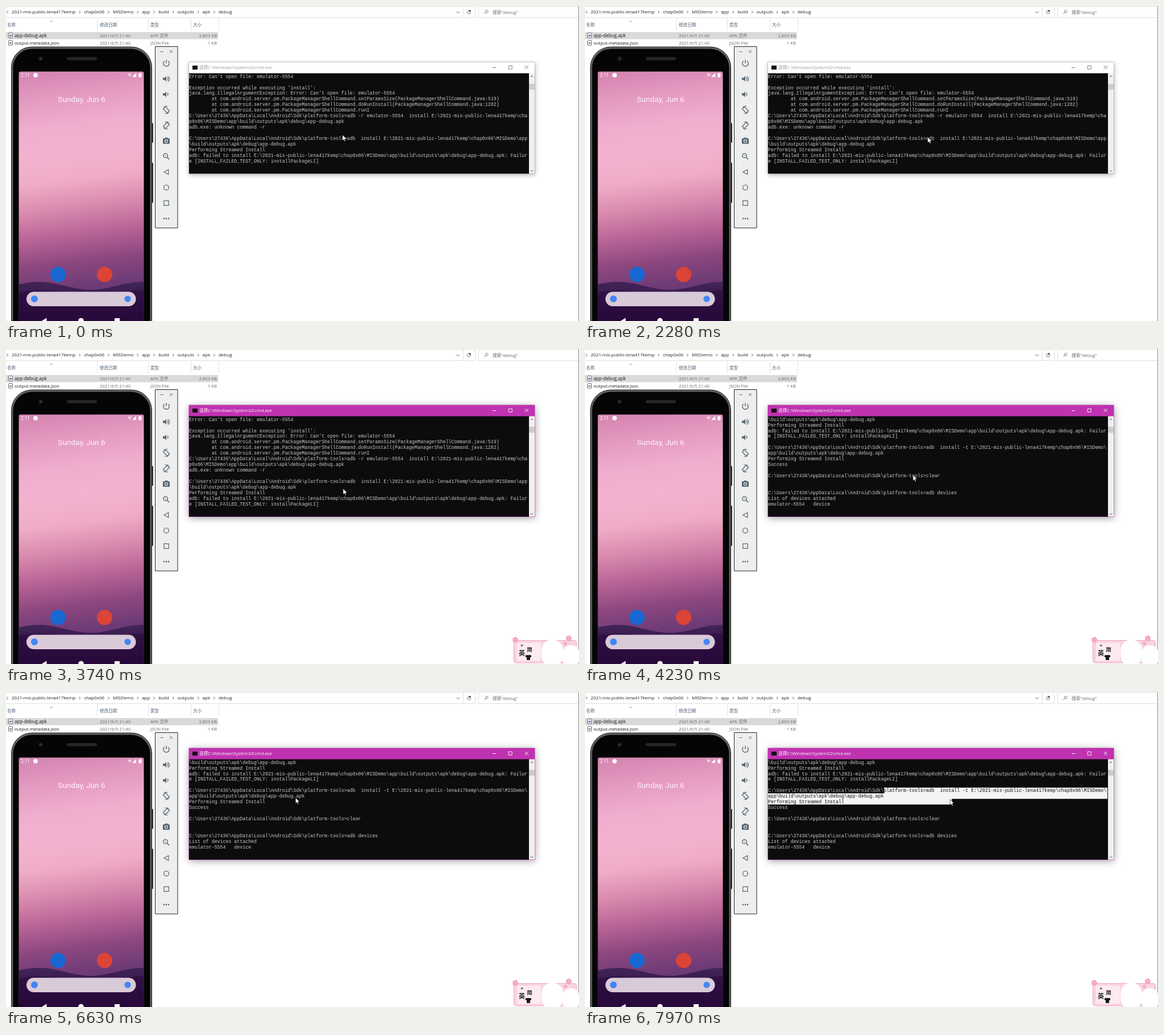
An HTML page with a canvas for the animation above (8 s loop, 1008 by 555 pixels).

```html
<!DOCTYPE html>
<html lang="zh">
<head>
<meta charset="utf-8">
<title>Install log</title>
<style>
html, body { margin: 0; width: 100%; height: 100%; overflow: hidden; background: #fff; }
canvas { display: block; width: 1008px; height: 555px; }
</style>
</head>
<body>
<canvas id="stage" width="1008" height="555"></canvas>
<script>
const ctx = document.getElementById('stage').getContext('2d');
const LOOP = 8000;
const UI = '"Open Sans", "Noto Sans CJK SC", "Noto Sans CJK", sans-serif';
const MONO = '"Liberation Mono", monospace';
const ROBOTO = 'Roboto, sans-serif';
const CELL_W = 4.975, CELL_H = 9.95, TERM_X = 322, TERM_Y = 119, COLS = 120, ROWS = 16;

const REPO = 'E:\\2021-mis-public-lena417kemp\\chap0x06\\MISDemo\\';
const PROMPT = 'C:\\Users\\27436\\AppData\\Local\\Android\\Sdk\\platform-tools>';
const PM = '        at com.android.server.pm.PackageManagerShellCommand.';
const APK = REPO + 'app\\build\\outputs\\apk\\debug\\app-debug.apk';
const LOG = [
  "Error: Can't open file: emulator-5554",
  '',
  "Exception occurred while executing 'install':",
  "java.lang.IllegalArgumentException: Error: Can't open file: emulator-5554",
  PM + 'setParamsSize(PackageManagerShellCommand.java:519)',
  PM + 'doRunInstall(PackageManagerShellCommand.java:1282)',
  PM + 'runI',
  PROMPT + 'adb -r emulator-5554  install ' + APK,
  'adb.exe: unknown command -r',
  '',
  PROMPT + 'adb  install ' + APK,
  'Performing Streamed Install',
  'adb: failed to install ' + APK + ': Failure [INSTALL_FAILED_TEST_ONLY: installPackageLI]',
  '',
  PROMPT + 'adb  install -t ' + APK,
  'Performing Streamed Install',
  'Success',
  '',
  PROMPT + 'clear',
  '',
  '',
  PROMPT + 'adb devices',
  'List of devices attached',
  'emulator-5554   device'
].flatMap(s => s ? s.match(/.{1,120}/g) : ['']);

// Pointer moves: start, end, x, y; it rests in between
const REST = { x: 592, y: 227 };
const MOVES = [
  [1060, 1380, 598, 232], [1630, 2070, 603, 231], [2280, 2640, 611, 234],
  [3010, 3340, 612, 240], [3580, 3740, 593, 246], [3740, 4230, 577, 222],
  [4390, 4600, 541, 156], [4800, 4960, 577, 154], [5170, 5610, 545, 173],
  [5940, 6140, 485, 190], [6470, 6850, 548, 180], [6850, 7240, 528, 173],
  [7280, 7400, 575, 178], [7400, 7970, 642, 189]
];
const ACTIVE_AT = 2400, IME_AT = 2520, SELECT_AT = 7280;
const SCROLL_AT = 3860, SCROLL_STEP = 90, SCROLL_NOTCHES = 4;

const clamp = (v, lo, hi) => Math.max(lo, Math.min(hi, v));

function pointer(t) {
  let { x, y } = REST;
  for (const [from, to, nx, ny] of MOVES) {
    const u = clamp((t - from) / (to - from), 0, 1);
    const e = u * u * (3 - 2 * u);
    x += (nx - x) * e;
    y += (ny - y) * e;
  }
  return { x, y };
}

function rect(x, y, w, h, color) {
  ctx.fillStyle = color;
  ctx.fillRect(x, y, w, h);
}
function paint(fill, stroke, lw = 1) {
  if (fill) { ctx.fillStyle = fill; ctx.fill(); }
  if (stroke) { ctx.strokeStyle = stroke; ctx.lineWidth = lw; ctx.stroke(); }
}
function round(x, y, w, h, r, fill, stroke, lw) {
  ctx.beginPath();
  ctx.roundRect(x, y, w, h, r);
  paint(fill, stroke, lw);
}
function circle(x, y, r, fill, stroke, lw) {
  round(x - r, y - r, r * 2, r * 2, r, fill, stroke, lw);
}
function trace(pts) {
  ctx.beginPath();
  for (let i = 0; i < pts.length; i += 2) ctx.lineTo(pts[i], pts[i + 1]);
}
function line(pts, color, lw) {
  trace(pts);
  paint(null, color, lw);
}
function poly(pts, color) {
  trace(pts);
  ctx.closePath();
  paint(color);
}
function arc(x, y, r, a, b, color, lw) {
  ctx.beginPath();
  ctx.arc(x, y, r, a, b);
  paint(null, color, lw);
}
// Chevron around (x, y); (dx, dy) is the way it points
function chevron(x, y, dx, dy, color, s = 2.2) {
  line([x - dx * s / 2 - dy * s, y - dy * s / 2 - dx * s, x + dx * s / 2, y + dy * s / 2,
    x - dx * s / 2 + dy * s, y - dy * s / 2 + dx * s], color, 1);
}
function cross(x, y, r, color) {
  line([x - r, y - r, x + r, y + r], color, 0.9);
  line([x + r, y - r, x - r, y + r], color, 0.9);
}
function text(s, x, y, size, color, align = 'left', font = UI) {
  ctx.font = size + 'px ' + font;
  ctx.fillStyle = color;
  ctx.textAlign = align;
  ctx.fillText(s, x, y);
}
function gradient(x0, y0, x1, y1, colors) {
  const g = ctx.createLinearGradient(x0, y0, x1, y1);
  colors.forEach((c, i) => g.addColorStop(i / (colors.length - 1), c));
  return g;
}

function addressBar() {
  for (const [l, r] of [[-1, 805], [804, 826], [831, 1010]])
    round(l + 0.5, 0.5, r - l - 1, 20, 0, null, '#dedede');
  let x = 10;
  for (const s of ['2021-mis-public-lena417kemp', 'chap0x06', 'MISDemo', 'app', 'build',
    'outputs', 'apk', 'debug']) {
    chevron(x - 7.5, 10.7, 1, 0, '#555');
    text(s, x, 13.4, 8, '#222');
    x += ctx.measureText(s).width + 14.8;
  }
  chevron(795.3, 11, 0, 1, '#555', 2.6);
  arc(814.5, 11, 2.8, -0.4, 5, '#555', 0.9);
  rect(814.5, 7, 3, 3, '#555');
  circle(845.6, 9.6, 2.3, null, '#666', 0.8);
  line([844, 11.3, 841.2, 14], '#666', 0.9);
  text('搜索"debug"', 856, 13.6, 7.8, '#6b6b6b');
}

function fileList() {
  for (const [s, x, edge] of [['名称', 2, 161], ['修改日期', 165, 251], ['类型', 254, 326], ['大小', 329, 375]]) {
    text(s, x, 36.3, 7.6, '#4d607a');
    rect(edge - 1, 22, 1, 21, '#e2e2e2');
  }
  chevron(80, 27, 0, -1, '#888');
  rect(0, 46, 373, 12.5, '#d9d9d9');
  const files = [['app-debug.apk', 'APK 文件', '2,803 KB', 8.1], ['output-metadata.json', 'JSON File', '1 KB', 7.75]];
  files.forEach(([name, kind, size, px], i) => {
    const y = 54.7 + 13.1 * i;
    round(4.5, y - 7.2, 7, 8.6, 1, '#fff', '#555', 0.9);
    rect(6, y - 4, 4, 3, i ? '#999' : '#5a7ea5');
    text(name, 15, y, px, '#1a1a1a');
    text('2021/6/5 21:40', 165, y, 7.75, '#6a6a6a');
    text(kind, 254, y, 7.75, '#6a6a6a');
    text(size, 371, y, 7.8, '#6a6a6a', 'right');
  });
}

function ridge(base, amp, color) {
  const pts = [243, 556, 22, 556];
  for (let x = 22; x <= 243; x += 4) pts.push(x, base - amp * Math.cos((x - 58) / 29));
  poly(pts, color);
}

function phone() {
  round(254, 206, 5, 35, 1.5, '#333');
  round(254, 276, 5, 71, 1.5, '#333');
  round(9.5, 72, 247, 600, 36, '#606264', '#222');
  round(12.5, 75.5, 241, 600, 33, '#050505');
  circle(61, 92.8, 4, '#15171f');
  circle(61, 92.8, 2.1, '#2b3050');
  round(107, 90, 53, 5.5, 2.7, '#262626');

  ctx.save();
  ctx.beginPath();
  ctx.roundRect(22.5, 115.5, 220, 450, 3);
  ctx.clip();
  rect(22, 115, 221, 440, gradient(105, 115, 155, 495,
    ['#d787b3', '#e59cc2', '#f0aecf', '#f3b3d0', '#efacc6', '#d98aae', '#b86496', '#8c477f', '#6c3a75']));
  ridge(493, 7, gradient(0, 485, 0, 555, ['#432659', '#341449', '#28093c']));
  ridge(507, 6, 'rgba(38,8,58,.5)');
  ctx.restore();

  text('2:11', 26, 124.8, 8.3, '#fff', 'left', ROBOTO);
  circle(52, 121.8, 3.9, '#fff');
  poly([213.5, 119, 221.5, 119, 217.5, 125], 'rgba(255,255,255,.55)');
  poly([222, 125, 229, 125, 229, 118], '#fff');
  round(233.3, 118.5, 5, 7, 0.7, '#fff');
  text('Sunday, Jun 6', 133, 169.3, 13.6, 'rgba(255,255,255,.88)', 'center', ROBOTO);

  circle(91.5, 473, 13.6, '#1967d2');
  circle(173.5, 473, 13.6, '#db4437');
  round(36, 503.5, 192.5, 25.5, 12.75, '#d9cad8');
  circle(50, 516, 6, '#4285f4');
  circle(214, 516, 5.6, '#4285f4');
  poly([61, 556, 71.5, 549.5, 71.5, 560], '#fff');
  circle(132, 554.5, 4.8, '#fff');
  rect(191, 550, 9, 6, '#fff');
}

// Toolbar icons, each drawn around (0, 0)
const INK = '#546570';
function speaker(waves) {
  rect(-6, -2, 4, 4, INK);
  poly([-4, 0, 0, -5, 0, 5], INK);
  for (let i = 0; i < waves; i++) arc(0.6, 0, 2.5 * (i + 1), -1.2, 1.2, INK, 1.2);
}
function rotate(dir) {
  ctx.scale(dir, 1);
  ctx.rotate(-Math.PI / 4);
  round(-2.7, -5, 5.4, 10, 0, null, INK, 1.3);
  for (const a of [1.6, 4.7]) arc(0, 0, 6.4, a, a + 1.2, INK);
}
const ICONS = [
  () => { arc(0, 0, 5.2, -0.9, Math.PI + 0.9, INK, 1.4); line([0, -6, 0, 0], INK, 1.4); },
  () => speaker(2),
  () => speaker(1),
  () => rotate(1),
  () => rotate(-1),
  () => { round(-6, -4.5, 12, 9.5, 1, INK); rect(-2.5, -6, 5, 2.5, INK); circle(0, 0.3, 2.5, null, '#eee', 1.1); },
  () => { circle(-1.5, -1.5, 3.8, null, INK, 1.3); line([1.3, 1.3, 5, 5], INK, 1.6); text('+', -1.5, 0.8, 6, INK, 'center'); },
  () => { trace([-4, 0, 3.8, -4.3, 3.8, 4.3]); ctx.closePath(); paint(null, INK, 1.2); },
  () => circle(0, 0, 4.4, null, INK, 1.2),
  () => round(-4.2, -4.2, 8.4, 8.4, 0, null, INK, 1.2),
  () => [-4, 0, 4].forEach(x => circle(x, 0, 1.3, INK))
];

function toolbar() {
  round(262.5, 71.5, 39.5, 319.5, 0, '#eee', '#222');
  rect(271.5, 80, 5, 1, '#666');
  cross(290.5, 80.3, 2.2, '#555');
  ICONS.forEach((icon, i) => {
    ctx.save();
    ctx.translate(282, 101 + 27.36 * i);
    icon();
    ctx.restore();
  });
}

function logRows(top, color) {
  for (let r = 0; r < ROWS; r++)
    text(LOG[top + r] || '', TERM_X, TERM_Y + r * CELL_H + 7.6, CELL_W / 0.6002, color, 'left', MONO);
}

// Cells from the anchor to the pointer, redrawn inverted
function selection(t, top) {
  const p = pointer(t - 30), row0 = 5, col0 = 41;
  const row = clamp(Math.floor((p.y - TERM_Y) / CELL_H), row0, 7);
  const col = Math.max(col0 + 1, Math.ceil((p.x - TERM_X) / CELL_W));
  ctx.save();
  ctx.beginPath();
  for (let r = row0; r <= row; r++) {
    const a = r === row0 ? col0 : 0, b = r === row ? col : COLS;
    ctx.rect(TERM_X + a * CELL_W, TERM_Y + r * CELL_H - 0.3, (b - a) * CELL_W, CELL_H);
  }
  ctx.clip();
  rect(TERM_X, TERM_Y, 598, 176, '#f4f4f4');
  logRows(top, '#111');
  ctx.restore();
}

function terminal(t) {
  const active = t >= ACTIVE_AT;
  const ink = active ? '#fff' : '#777';
  ctx.save();
  ctx.shadowColor = active ? 'rgba(0,0,0,.4)' : 'rgba(0,0,0,.28)';
  ctx.shadowBlur = active ? 13 : 8;
  ctx.shadowOffsetY = 2;
  rect(321.5, 98.5, 609, 197.3, active ? '#bf32b0' : '#999');
  ctx.restore();
  rect(322, 99, 608, 20, active ? '#bf32b0' : '#fff');
  rect(328, 105, 9, 7, '#111');
  text('选择C:\\Windows\\System32\\cmd.exe', 340, 111.3, 7.68, active ? '#fff' : '#999');
  rect(856, 108, 6, 1, ink);
  round(884.2, 105.2, 6, 6, 0, null, ink, 0.9);
  cross(915.7, 108.2, 3.2, ink);

  rect(322, 118.5, 598, 176.8, '#0c0c0c');
  rect(920, 118.5, 10, 176.8, '#f0f0f0');
  rect(920, 137, 10, 10.5, '#cdcdcd');
  chevron(925, 124, 0, -1, '#505050');
  chevron(925, 290.7, 0, 1, '#505050');

  const notches = Math.floor((t - SCROLL_AT) / SCROLL_STEP) + 1;
  const top = 3 * clamp(notches, 0, SCROLL_NOTCHES);
  logRows(top, '#c8c8c8');
  if (t >= SELECT_AT) selection(t, top);
}

function flower(x, y, r) {
  for (let k = 0; k < 5; k++) {
    const a = k * Math.PI * 0.4;
    circle(x + r * 0.6 * Math.cos(a), y + r * 0.6 * Math.sin(a), r * 0.48, '#f3a6c0');
  }
}

function inputBar() {
  round(893.5, 513.5, 110, 39.5, 4, '#f9d3df', '#eda5bf');
  round(899, 517.5, 42, 32, 3, '#fdeaf0');
  flower(896, 512.5, 5);
  flower(990, 510, 5);
  flower(984, 519, 3);
  text('"', 907.5, 529, 'bold 10', '#222', 'center');
  text('英', 907.5, 539.5, 'bold 11', '#222', 'center');
  text('简', 921, 532.5, 'bold 9.5', '#222', 'center');
  rect(914, 539.5, 10, 3.5, '#151515');
  rect(916, 539.5, 6, 8.5, '#151515');
  round(942, 512.5, 38, 46, 18, '#fff');
  round(979, 522, 30, 38, 14, '#fff');
}

function cursor({ x, y }) {
  ctx.save();
  ctx.translate(x, y);
  trace([0, 0, 0, 10.2, 2.3, 8.1, 3.9, 11.6, 5.4, 10.9, 3.9, 7.5, 7, 7.3]);
  ctx.closePath();
  paint('#fff', '#111', 0.6);
  ctx.restore();
}

function draw(now) {
  const t = now % LOOP;
  rect(0, 0, 1008, 555, '#fff');
  addressBar();
  fileList();
  rect(1007, 0, 1, 555, '#8a8a8a');
  phone();
  toolbar();
  terminal(t);
  if (t >= IME_AT) inputBar();
  cursor(pointer(t));
  requestAnimationFrame(draw);
}
requestAnimationFrame(draw);
</script>
</body>
</html>
```
